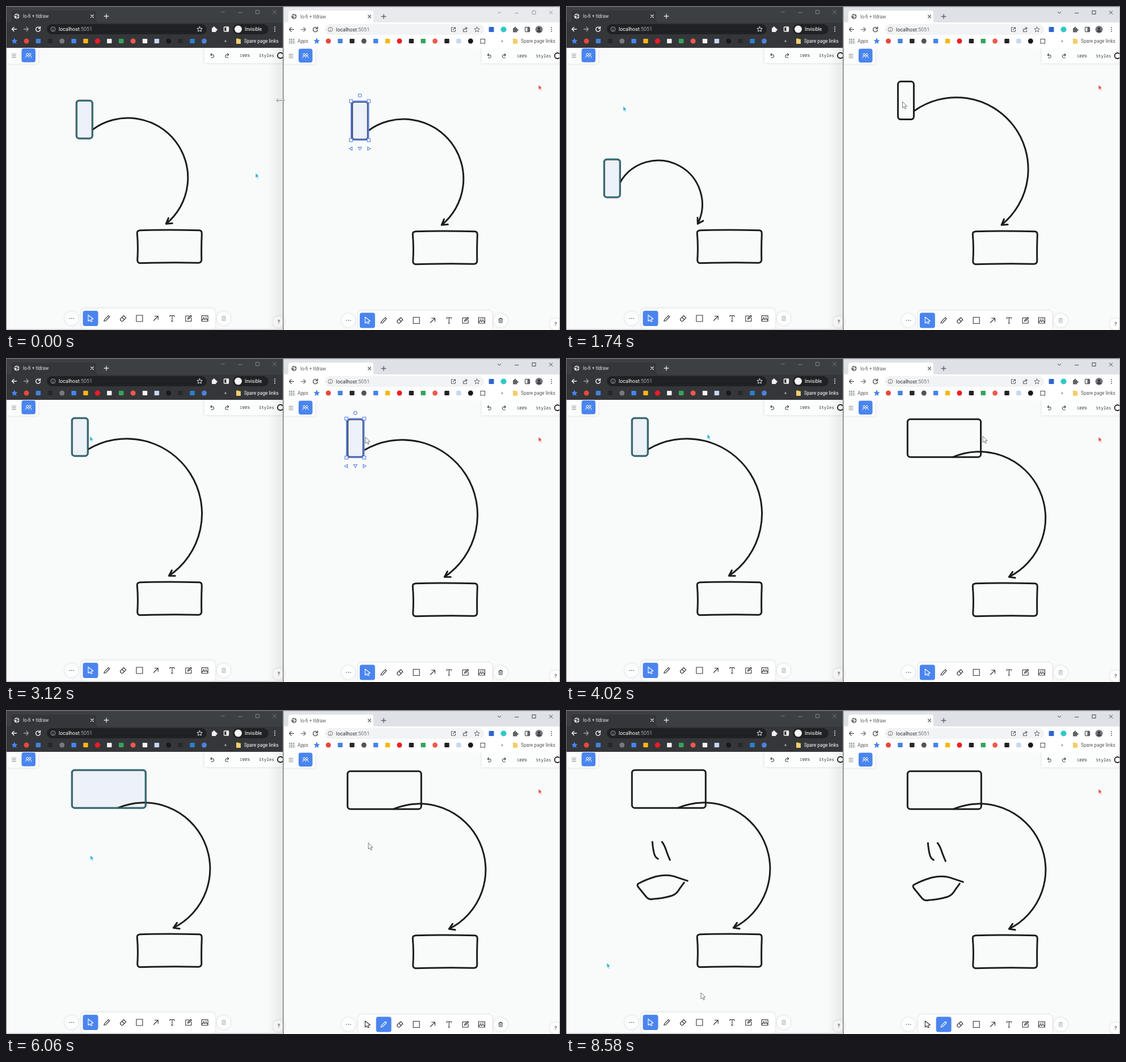
Recreate the animation shown at these times as an HTML page. Size 977 px wide and 573 px high, loop 8640 ms.

```html
<!DOCTYPE html>
<html lang="en">
<head>
<meta charset="utf-8">
<title>Shared whiteboard</title>
<style>
html, body { margin: 0; width: 100%; height: 100%; overflow: hidden; background: #f9fbfb; }
svg { display: block; width: 977px; height: 573px; }
text { font: 8.3px Roboto, "Open Sans", sans-serif; }
.mono { font: 7.5px "Noto Sans Mono", "DejaVu Sans Mono", monospace; }
.soft { filter: drop-shadow(0 0 2px #0002); }
.ink { fill: none; stroke: #1d1d1d; stroke-width: 3; stroke-linecap: round; stroke-linejoin: round; }
</style>
</head>
<body>
<svg id="stage" viewBox="0 0 977 573"></svg>
<script>
const LOOP = 8640, STEP = 60, OFFSET = [486, 2], SYNC_LAG = 500, POINTER_LAG = 90;
const BLUE = '#4a85ee';
const stage = document.getElementById('stage');
const $ = id => document.getElementById(id);

// ---- markup helpers ----
const at = (x, y, body, extra = '') => `<g transform="translate(${x} ${y})" ${extra}>${body}</g>`;
const line = (d, color, width = 1.1, fill = 'none') =>
  `<path d="${d}" fill="${fill}" stroke="${color}" stroke-width="${width}" stroke-linejoin="round" stroke-linecap="round"/>`;
const box = (x, y, w, h, fill, r = 0, extra = '') =>
  `<rect x="${x}" y="${y}" width="${w}" height="${h}" rx="${r}" fill="${fill}" ${extra}/>`;
const dot = (x, y, r, fill, extra = '') => `<circle cx="${x}" cy="${y}" r="${r}" fill="${fill}" ${extra}/>`;
const label = (x, y, str, fill, extra = '') => `<text x="${x}" y="${y}" fill="${fill}" ${extra}>${str}</text>`;

const star = (x, y, color, fill = 'none') =>
  at(x, y, line('M0-4.5L1.3-1.5 4.6-1.3 2.1.9 2.9 4.1 0 2.4-2.9 4.1-2.1.9-4.6-1.3-1.3-1.5Z', color, 1, fill));
const globe = (x, y, fill, land) => at(x, y, dot(0, 0, 4.6, fill) + line('M-3-1.5L0-.8 1-3M3 0L0 1 .6 3', land, 1.5));
const puzzle = (x, y, fill) =>
  at(x, y, box(-4.5, -2.5, 7.5, 7.5, fill, 1) + dot(-.7, -3, 1.8, fill) + dot(3.4, 1, 1.8, fill));
const panelIcon = (x, y, color) =>
  at(x, y, box(-4, -4, 8, 8, 'none', 1, `stroke="${color}" stroke-width="1.4"`) + box(0, -4, 4, 8, color));
const folder = (x, y) => at(x, y, line('M-3.5 4V-4H0L1-3H3.5V4Z', '#f3cd6b', 1, '#f3cd6b'));
const dots = (x, y, color, vertical) =>
  [-3.5, 0, 3.5].map(d => vertical ? dot(x, y + d, 1, color) : dot(x + d, y, .8, color)).join('');

// ---- browser chrome ----
function navigation(x, y, color, faded) {
  return at(x, y, line('M4 0H-4M-.5-3.5L-4 0-.5 3.5', color, 1.4)) +
    at(x + 21, y, line('M-4 0H4M.5-3.5L4 0 .5 3.5', faded, 1.4)) +
    at(x + 42, y, line('M3-2.6A4 4 0 1 0 4 1M4-4.5V-1.3H.8', color, 1.4)) +
    at(x + 68.5, y, dot(0, 0, 4, 'none', `stroke="${faded}"`) + line('M0 0V2M0-2V-1.9', faded));
}
const tab = (x, y, fill, ink) =>
  `<path d="M${x} 29q4 0 4-4V12q0-4 4-4H${x + 150}q4 0 4 4V25q0 4 4 4Z" fill="${fill}"/>` +
  globe(x + 14, y, ink, fill) + label(x + 25, y + 3, 'lo-fi + tldraw', ink) +
  at(x + 147, y, line('M-2.5-2.5L2.5 2.5M2.5-2.5L-2.5 2.5', ink)) +
  at(x + 172, y, line('M-3.8 0H3.8M0-3.8V3.8', ink, 1.3));
const windowButtons = (x, y, color, id) =>
  at(x, y, '<path d="M-3-1.5L0 1.5 3-1.5M27 1H34M58-3H64V3H58ZM88-3L94 3M94-3L88 3" fill="none"/>',
    `id="${id}" stroke="${color}"`);
const address = (x, y, strong, weak) =>
  `<text x="${x}" y="${y}" style="font-size:9px" fill="${strong}">localhost<tspan fill="${weak}">:5051</tspan></text>`;

// One plain mark per bookmark, evenly spaced.
const bookmarks = (x, colors) => colors.map((c, i) => {
  const cx = x + i * 20.9;
  return i % 3 ? box(cx - 4.2, 58, 8.4, 8, c, 1) : dot(cx, 62, 4.5, c);
}).join('');
const shared = ['#e8493c', '#4285dc'];
const sites = ['#4285ee', '#f5b912', '#f01d20'];

const leftChrome = box(0, 0, 489, 29, '#3c4043') + tab(5, 18, '#35363a', '#dfe1e5') +
  windowButtons(382.5, 10.5, '#85878a', 'leftButtons') +
  box(0, 29, 489, 45, '#35363a') + box(72, 32, 282, 18, '#202124', 9) +
  navigation(14.5, 41, '#f1f3f4', '#9aa0a6') + address(93, 44.3, '#fff', '#a5a9ae') +
  star(341.5, 41, '#e8eaed') + puzzle(367.5, 41, '#f1f3f4') + panelIcon(388.5, 41, '#f1f3f4') +
  box(400, 32, 63, 18, '#202124', 9) + dot(409.5, 41, 6.5, '#f1f3f4') +
  label(421, 44, 'Invisible', '#fff') + dots(474, 41, '#f1f3f4', true) +
  star(15, 62, BLUE, BLUE) +
  bookmarks(36, [...shared, '#24292e', '#777a7d', ...sites, '#f3f3f3', '#35a45a', '#ea5b4c', '#f5f5f5', '#c5d7f3', '#17191b', '#25272a', '#2d80cc', '#4e80dc']) +
  label(385, 65, '»', '#fff') + folder(410, 62) + label(420, 64.8, 'Spare page links', '#fff');

const rightChrome = box(490, 0, 487, 29, '#e8eaed', 0, 'id="titleBar"') + tab(494, 18.5, '#fff', '#5c6064') +
  windowButtons(870, 11.5, '#999', 'rightButtons') +
  box(490, 29, 487, 46, '#fff') + box(562, 32, 281, 19, '#f1f3f4', 9.5) +
  navigation(503.5, 41.5, '#55585c', '#777b80') + address(582, 44.8, '#303134', '#777') +
  at(789, 41.5, line('M-.5-3.5H-3.5V3.5H3.5V.5M1-3.5H3.5V-1M3.5-3.5L-.5.5', '#666')) +
  at(809.5, 41.5, line('M-3-1V4H3V2M-1.5 1Q-1-2 2-2M1-4L4-2 1 0', '#666')) +
  star(830.5, 41.5, '#666') + box(851.5, 37, 9, 9, '#2f66cf', 1) + dot(877.5, 41.5, 5, '#30c7c7') +
  puzzle(898.5, 41.5, '#5f6368') + panelIcon(919.5, 41.5, '#5f6368') +
  dot(940, 41.5, 6.5, '#77777f') + dot(940, 40, 2.2, '#33343c') + line('M936.5 45Q940 41 943.5 45Z', '#33343c', 1, '#33343c') +
  dots(962, 41.5, '#5f6368', true) +
  [0, 1, 2].map(i => [0, 1, 2].map(j => box(499.5 + i * 3.5, 58 + j * 3.2, 2, 2, ['#e34d41', '#4a85e8', '#3ca55b'][(i + j) % 3])).join('')).join('') +
  label(514, 65, 'Apps', '#55585c') + star(548, 62, BLUE, BLUE) +
  bookmarks(568.5, [...shared, '#24292e', '#555', ...sites, '#222', '#35a45a', '#ea5b4c', '#222', '#c5d7f3', '#17191b']) +
  box(837, 58.5, 7.5, 7.5, 'none', 0, 'stroke="#444"') +
  label(873, 65, '»', '#555') + folder(898, 62) + label(908, 65, 'Spare page links', '#55585c');

// ---- whiteboard interface ----
const header = (x, y) => at(x, y,
  '<g class="soft">' + box(1, 74, 56, 28, '#fcfdfd', 2) + box(350, 74, 139, 27, '#fcfdfd', 2) + '</g>' +
  line('M10.5 85H17.5M10.5 88H17.5M10.5 91H17.5', '#777', .9) + box(27.5, 75, 24.5, 24.5, BLUE, 4) +
  dot(37.5, 85.5, 1.9, 'none', 'stroke="#fff"') + dot(42, 85.5, 1.9, 'none', 'stroke="#fff"') +
  line('M34.5 91Q35 88 37.5 88T40.5 91M41 88Q44.5 87.5 45 91', '#fff', 1) +
  line('M361 86H364.5A2.7 2.7 0 0 1 364.5 91.3H362M363 83.8L360.8 86 363 88.2', '#444') +
  line('M392.5 86H389A2.7 2.7 0 0 0 389 91.3H391.5M390.5 83.8L392.7 86 390.5 88.2', '#444') +
  label(412, 90, '100%', '#444', 'class="mono"') + label(446, 90, 'Styles', '#333', 'class="mono"') +
  dot(484, 87.5, 5, 'none', 'stroke="#1d1d1d" stroke-width="1.8"'));

const TOOLS = [
  'M-4-6V5L-1 2.5 1 6 3 5 1.3 1.5 5 1Z',
  'M-5 5L-4 1.8 3-5 5-3-1.8 4Z',
  'M-5 1L1-5 5-1-1 5H-3L-5 3ZM-2-2L2 2',
  'M-5.5-5.5H5.5V5.5H-5.5Z',
  'M-4 4L4-4M-2-4H4V2',
  'M-4-3V-5H4V-3M0-5V5M-1.5 5H1.5',
  'M1-4.5H-5V5H5V-1M-1.5 1.5L-1-.5 4-5.5 5.5-4 .5 1Z',
  'M-5.5-5H5.5V5H-5.5ZM-5 3L-2 0 0 2 2 0 5 3M1-2.5H3M-3-2H-1'
];
const toolRow = selected => TOOLS.map((d, i) => {
  const active = i === selected;
  return at(149 + i * 28.8, 552.5, (active ? box(-13.5, -13.5, 27, 27, BLUE, 4) : '') + line(d, active ? '#fff' : '#333'));
}).join('');
const toolbar = (x, y, id) => at(x, y,
  '<g class="soft">' + box(133, 535, 236, 37, '#fff', 8) + dot(115.5, 552.5, 12, '#fcfdfd') +
  dot(384, 552.5, 12, '#fcfdfd') + dot(481, 559, 10, '#fff') + '</g>' +
  dots(115.5, 552.5, '#444') + `<g id="${id}Tools">${toolRow(0)}</g>` +
  at(384, 552.5, '<path d="M-3.5-2.5H3.5M-1.3-2.5V-4H1.3V-2.5M-2.7-2.5V4H2.7V-2.5M-.8-.5V2.3M.8-.5V2.3" fill="none"/>', `id="${id}Trash" stroke="#aaa" stroke-width=".9"`) +
  label(478.7, 562, '?', '#333', 'style="font-size:9px"'));

const STROKES = [
  { d: 'M153 233Q154 245 156 253T163 263', from: 6140, to: 6380 },
  { d: 'M170 233Q174 238 177 247T184 265', from: 6620, to: 6840 },
  { d: 'M215 302L191 294Q179 290 160 294 140 300 128 307 125 309 129 314L142 330Q147 336 154 334 172 333 188 328 196 325 201 316L209 305', from: 7300, to: 8060 }
];
const board = (id, x, y) => at(x - .7, y + .2,
  '<path class="ink" d="M237 396.5Q290 395 342 396.5 346 397 346 402 345 425 345.5 449 345 454 340 454 290 453 237 454.5 232 454 232.5 448 234 425 232 402 231.5 397 237 396.5Z"/>' +
  `<rect id="${id}Rect" rx="5" class="ink"/><path id="${id}Arrow" class="ink"/><rect id="${id}Outline" rx="5" fill="none" stroke-width="1.5"/>` +
  STROKES.map((s, i) => `<path id="${id}Stroke${i}" class="ink" d="${s.d}" pathLength="1"/>`).join('') +
  `<g id="${id}Handles" fill="#fff" stroke="#6689ec" stroke-width="1.2"></g>`);

const pointer = (id, fill, edge, scale) =>
  `<g id="${id}"><path transform="scale(${scale})" d="M0 0V11L2.6 8.7 4.4 12.8 6.2 12 4.4 8H8Z" fill="${fill}" stroke="${edge}" stroke-width=".9"/></g>`;

const windowShadow = '<linearGradient id="shade"><stop stop-opacity="0"/><stop offset="1" stop-opacity=".07"/></linearGradient>' +
  box(460, 74, 28, 497, 'url(#shade)');

stage.innerHTML = box(0, 0, 977, 573, '#f9fbfb') + board('left', 0, 0) + board('right', ...OFFSET) +
  header(0, 0) + header(488.5, .5) + toolbar(0, 0, 'left') + toolbar(488.3, 3.5, 'right') + windowShadow +
  leftChrome + rightChrome +
  box(0, 571, 489, 2, '#d5d7d8') + box(488, 0, 1.7, 573, '#85888a') + box(0, 0, 977, 1.5, '#777') +
  box(0, 0, 1, 573, '#777') + box(976, 0, 1, 573, '#aaa') +
  at(484, 167, line('M-7 0H7M-4-3L-7 0-4 3M4-3L7 0 4 3', '#777', 1, '#fff'), 'id="resizer"') +
  pointer('cyan', '#36b5cf', '#fff', .85) + pointer('red', '#e7503d', '#fff', .85) + pointer('mouse', '#fff', '#666', 1);

// ---- motion ----
// Keys: time, x, y, width, arrow start x, arrow start y, arrow end x
const SHAPE = [
  [640, 125, 167, 28, 154, 218, 283],
  [1000, 68, 271, 28, 96, 312, 233],
  [1340, 68, 271, 28, 96, 312, 233],
  [1600, 91, 145, 28, 120, 195, 280],
  [2000, 117, 106, 28, 146, 161, 288],
  [3540, 117, 106, 28, 146, 161, 288],
  [3960, 117, 106, 129, 197, 173, 296],
  [4200, 117, 106, 130, 198, 173, 296]
];
const MOUSE = [
  [120, 494, 168], [440, 616, 190], [640, 614, 206], [1000, 558, 326], [1340, 558, 326], [1600, 583, 184],
  [2000, 613, 142], [2600, 613, 142], [3000, 634, 140], [3540, 634, 140], [3920, 735, 136], [4560, 735, 150],
  [5200, 666, 552], [5600, 666, 552], [5960, 634, 261], [6060, 639, 235], [6140, 639, 235], [6380, 649, 265],
  [6620, 656, 235], [6840, 670, 267], [7240, 701, 304], [7380, 672, 294], [7560, 613, 311], [7720, 634, 337],
  [7900, 676, 330], [8060, 695, 307], [8220, 558, 449], [8520, 238, 500]
];
const REMOTE_START = [[840, 440, 295], [1080, 127, 200], [1300, 72, 324]];

function track(keys, t) {
  if (t <= keys[0][0]) return keys[0].slice(1);
  const i = keys.findIndex(k => k[0] > t);
  if (i < 0) return keys[keys.length - 1].slice(1);
  const a = keys[i - 1], b = keys[i], p = (t - a[0]) / (b[0] - a[0]);
  return a.slice(1).map((v, n) => v + (b[n + 1] - v) * p);
}
const within = (t, ...spans) => spans.some(([from, to]) => t >= from && t < to);
const show = (id, on) => $(id).setAttribute('display', on ? 'inline' : 'none');
const set = (id, attrs) => { for (const k in attrs) $(id).setAttribute(k, attrs[k]); };
const place = (id, [x, y]) => set(id, { transform: `translate(${x} ${y})` });

// The connector is an arc whose height is BEND times half its chord.
const BEND = .97;
function arrowPath(sx, sy, ex, ey) {
  const r = Math.hypot(ex - sx, ey - sy) / 2 * (1 + BEND * BEND) / (2 * BEND);
  const back = Math.atan2(ey - sy, ex - sx) - 2 * Math.atan(BEND);
  const barb = turn => `${ex - 11 * Math.cos(back + turn + Math.PI)} ${ey - 11 * Math.sin(back + turn + Math.PI)}`;
  return `M${sx} ${sy}A${r} ${r} 0 0 1 ${ex} ${ey}M${barb(.55)}L${ex} ${ey}L${barb(-.55)}`;
}

function drawBoard(id, t, selected, accent, tint) {
  const [x, y, width, sx, sy, ex] = track(SHAPE, t);
  const rect = { x, y, width, height: 67 };
  set(id + 'Rect', rect);
  $(id + 'Rect').style.fill = selected ? tint : 'none';
  set(id + 'Outline', { ...rect, stroke: accent });
  show(id + 'Outline', selected);
  set(id + 'Arrow', { d: arrowPath(sx, sy, ex, 385) });
  STROKES.forEach((s, i) => {
    const p = Math.min(1, (t - s.from) / (s.to - s.from));
    show(id + 'Stroke' + i, p > 0);
    set(id + 'Stroke' + i, { 'stroke-dasharray': p < 1 ? `${Math.max(0, p)} 2` : 'none' });
  });
  return rect;
}

function handles({ x, y, width, height }) {
  const l = x - 2, r = x + width + 1.5, top = y - 1, bottom = y + height + 1, mid = (l + r) / 2;
  const corner = (cx, cy) => box(cx - 2.7, cy - 2.7, 5.4, 5.4, '#fff');
  return box(l, top, r - l, bottom - top, 'none') +
    corner(l, top) + corner(r, top) + corner(l, bottom) + corner(r, bottom) + dot(mid, top - 10, 2.8, '#fff') +
    `<path d="M${l + 2} ${bottom + 12}v6l-5-3zM${mid - 3} ${bottom + 12.5}h6l-3 5zM${r - 2} ${bottom + 12}v6l5-3z"/>`;
}

let tool = -1;
function render(t) {
  const selected = within(t, [0, 600], [2280, 3420], [4260, 5580]);
  const rect = drawBoard('right', t, selected, '#527de0', '#edf1fa');
  drawBoard('left', t - SYNC_LAG, t < 6360, '#3095a3', '#edf2f9');
  show('rightHandles', selected);
  if (selected) $('rightHandles').innerHTML = handles(rect);
  set('rightTrash', { stroke: selected || within(t, [5580, 6120]) ? '#333' : '#aaa' });

  const active = t >= 480;
  set('titleBar', { fill: active ? '#dee1e6' : '#e8eaed' });
  set('rightButtons', { stroke: active ? '#444' : '#999' });

  const nextTool = t < 5520 ? 0 : 1;
  if (nextTool !== tool) $('rightTools').innerHTML = toolRow(tool = nextTool);

  show('resizer', t < 120);
  show('mouse', t >= 120);
  place('mouse', track(MOUSE, t));
  const [mx, my] = track(MOUSE, Math.min(t - POINTER_LAG, 8220));
  place('cyan', t < 1300 ? track(REMOTE_START, t) : [mx - OFFSET[0], my - OFFSET[1]]);
}
place('red', [939, 139]);

const begin = performance.now();
function tick() {
  const t = (performance.now() - begin) % LOOP;
  render(Math.floor(t / STEP) * STEP);
  requestAnimationFrame(tick);
}
tick();
</script>
</body>
</html>
```
